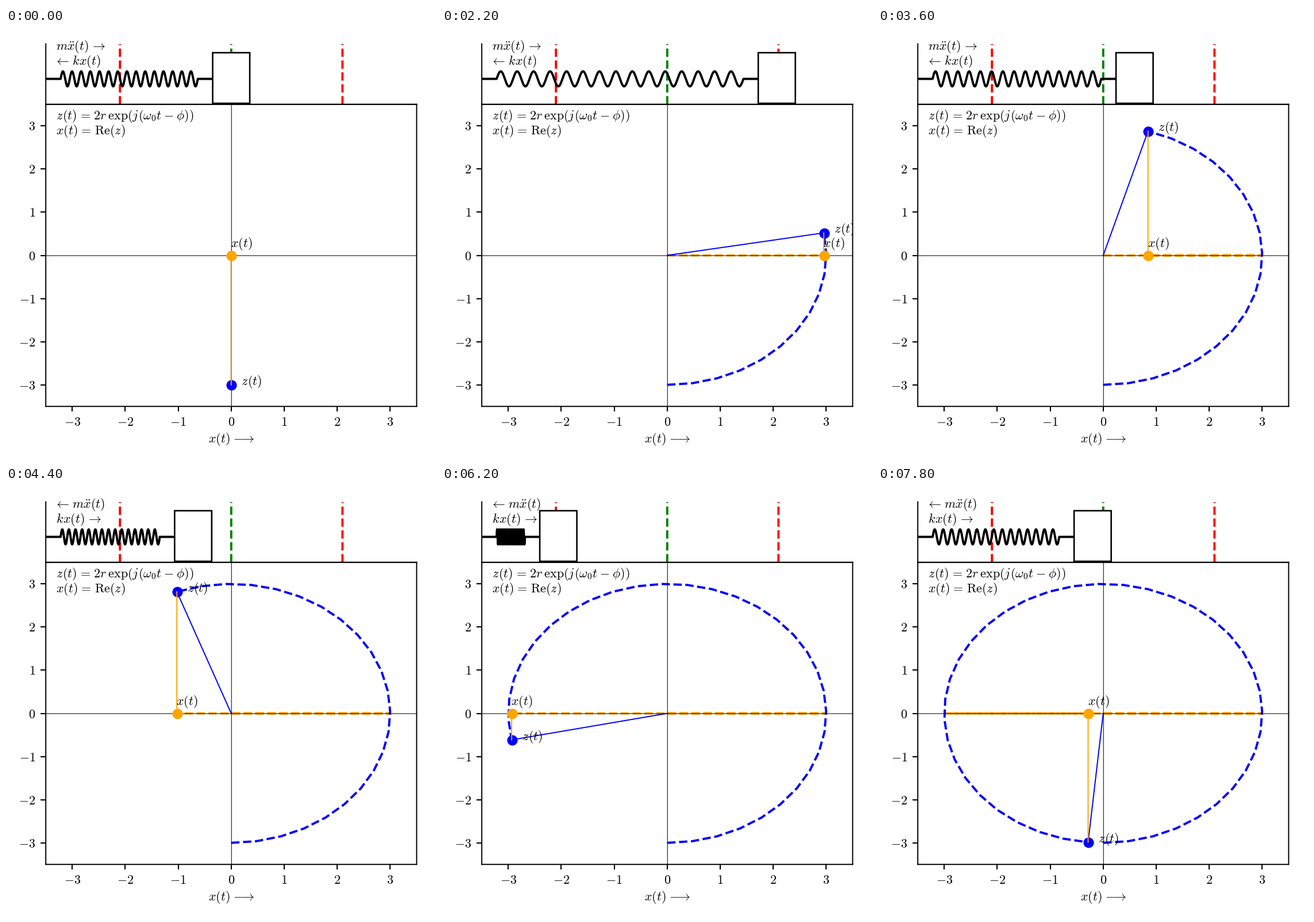
Recreate the animation shown at these times as a matplotlib script. Size 748x748 px, loop 8000 ms.

```python
import numpy as np
import matplotlib.pyplot as plt
from matplotlib.animation import FuncAnimation
from matplotlib.patches import Rectangle
from matplotlib.transforms import Affine2D

SIZE, DPI = 748, 187
LEFT, RIGHT, TOP, SPLIT, BOTTOM = 69.2, 714.35, 27.6, 132.8, 658.25
FRAMES, INTERVAL = 40, 200
STEP = np.radians(900 / 99)      # phase advance per frame
AMP, SCALE = 3.0, 0.7            # circle radius, block travel per unit
HALF, WIRE, COILS = 0.35, 0.28, 15
MID = 44.3                       # spring height above the rail, in pixels

plt.rcParams.update({"mathtext.fontset": "cm", "font.size": 8.5,
                     "path.snap": False, "axes.linewidth": 0.75,
                     "lines.linewidth": 1.5})

# mathtext pieces, kerned the way TeX sets them
EQ = r"\hspace{0.116}=\hspace{0.116}"
ZT = r"z\hspace{0.05}(t)"
RIGHT_ARROW = r"\hspace{0.116}\rightarrow"
LEFT_ARROW = r"\hspace{-0.2}\leftarrow\hspace{0.116}"
LONG_ARROW = r"\hspace{0.316}{-}\hspace{-0.39}\rightarrow\hspace{-0.2}"
MX = r"m\ddot{x}(t)"
KX = r"k\hspace{0.036}x(t)"

fig = plt.figure(figsize=(SIZE / DPI, SIZE / DPI), dpi=DPI, facecolor="white")


def add_axes(top, bottom, ylim):
    ax = fig.add_axes([LEFT / SIZE, 1 - bottom / SIZE,
                       (RIGHT - LEFT) / SIZE, (bottom - top) / SIZE])
    ax.set(xlim=(-3.5, 3.5), ylim=ylim, facecolor="none")
    return ax


def label(y, tex, x=87.4, **kw):
    return fig.text(x / SIZE, 1 - y / SIZE, f"${tex}$", va="baseline", **kw)


# spring and block
rail = add_axes(TOP, SPLIT, (0, SPLIT - TOP))
rail.set(xticks=[], yticks=[])
rail.spines[["top", "right"]].set_visible(False)
for x, color in ((-AMP, "red"), (0, "green"), (AMP, "red")):
    rail.axvline(x * SCALE, ls="--", color=color)
spring, = rail.plot([], [], color="black", zorder=3)
block = rail.add_patch(Rectangle((0, 1.8), 2 * HALF, 88, fc="white",
                                 ec="black", lw=1, zorder=4))

# complex plane
plane = add_axes(SPLIT, BOTTOM, (-3.5, 3.5))
ticks = range(-3, 4)
names = [f"${v}$" for v in ticks]
plane.set_xticks(ticks, names)
plane.set_yticks(ticks, names)
nudged = plane.transData + Affine2D().translate(0.45, -0.45)


def dot(color):
    return plane.scatter([0], [0], s=7 ** 2, color=color, lw=0, zorder=2,
                         transform=nudged)


x_trail, = plane.plot([], [], "--", color="orange")
z_trail, = plane.plot([], [], "--", color="blue")
for ends in ((-3.5, 3.5), (0, 0)), ((0, 0), (-3.5, 3.5)):
    plane.plot(*ends, color="black", lw=0.4, transform=nudged)
radius, = plane.plot([], [], color="blue", lw=0.75)
z_dot = dot("blue")
drop, = plane.plot([], [], color="orange", lw=0.75)
x_dot = dot("orange")
x_name = plane.text(0, 0, "$x(t)$", clip_on=True)
z_name = plane.text(0, 0, f"${ZT}$", clip_on=True)

inertia = label(38, MX)
force = label(64, KX)
label(159, ZT + EQ + r"2r\hspace{0.032}\,\exp(j\hspace{0.065}(\omega_0 t"
      r"\hspace{0.053}-\hspace{0.053}\phi))")
label(185, "x(t)" + EQ + r"\mathrm{Re}(z\hspace{0.05})")
label(721, "x(t)" + LONG_ARROW, x=(LEFT + RIGHT) / 2, ha="center")

u = np.linspace(0, 1, 1200)
wave = MID + 13.1 * np.sin(2 * np.pi * COILS * u)


def draw(i):
    z = AMP * np.exp(1j * (STEP * np.arange(i + 1) - np.pi / 2))
    x, y = z[-1].real, z[-1].imag

    edge = SCALE * x - HALF
    start, end = -3.5 + WIRE, edge - WIRE
    spring.set_data(np.r_[-3.5, start + (end - start) * u, edge],
                    np.r_[MID, wave, MID])
    block.set_x(edge)

    x_trail.set_data(z.real, 0 * z.real)
    z_trail.set_data(z.real, z.imag)
    radius.set_data([0, x], [0, y])
    drop.set_data([x, x], [0, y])
    z_dot.set_offsets([(x, y)])
    x_dot.set_offsets([(x, 0)])
    x_name.set_position((x - 0.01, 0.2))
    z_name.set_position((x + 0.19, y))

    if x >= 0:
        inertia.set_text(f"${MX}{RIGHT_ARROW}$")
        force.set_text(f"${LEFT_ARROW}{KX}$")
    else:
        inertia.set_text(f"${LEFT_ARROW}{MX}$")
        force.set_text(f"${KX}{RIGHT_ARROW}$")
    return ()


anim = FuncAnimation(fig, draw, frames=FRAMES, interval=INTERVAL,
                     repeat=True, repeat_delay=0)
plt.show()
```
